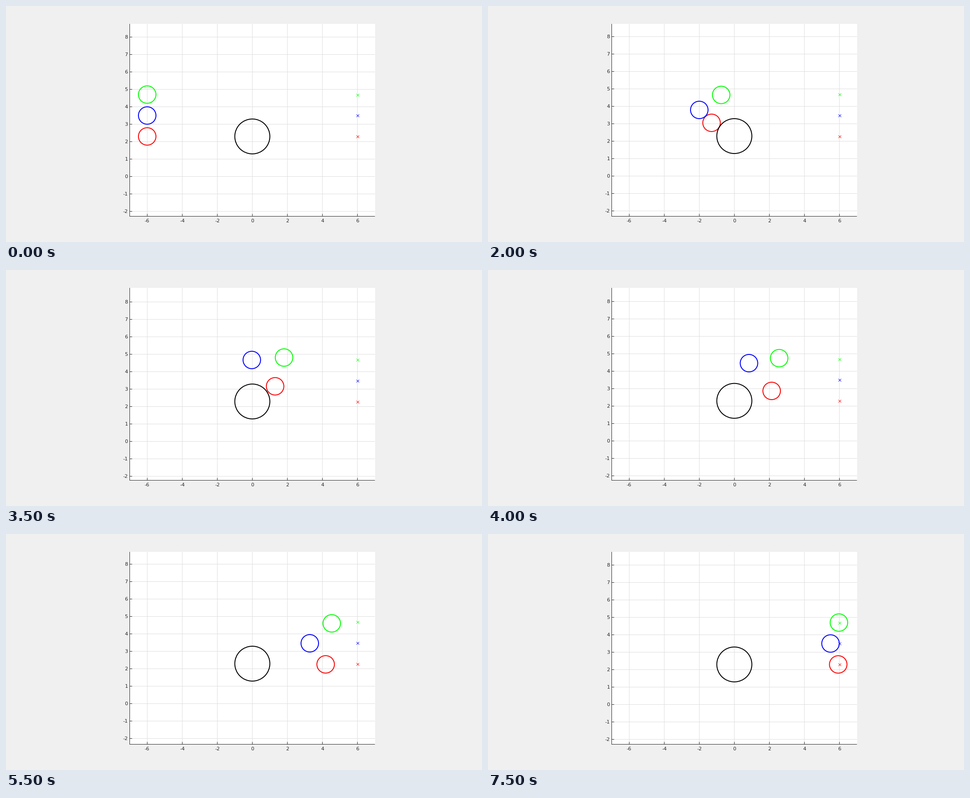
Animation of 1060x528 px, one loop 8000 ms. Source, as a matplotlib script:

```python
import math

import numpy as np
import matplotlib.pyplot as plt
from matplotlib.animation import FuncAnimation
from matplotlib.patches import Circle, Rectangle

W, H, DPI = 1060, 528, 100
PX = 72 / DPI                      # one pixel in points
FRAMES, STEP = 16, 500

# Plot area in pixels, y pointing down
LEFT, RIGHT, TOP, BOTTOM = 275, 821.6, 39.6, 470
MID_X, MID_Y, UNIT = 548.55, 254.75, 39.02
INK, GRID = "#262626", "#dedede"

BLOCK_Y, BLOCK_R = 2.3, 1.0
RADIUS, GOAL_X = 0.5, 6

# Key poses: steps, then x and y of each disc at those steps
KEYS = (0, 2, 4, 5, 7, 10, 13, 15)
PATHS = {
    "#ff0000": ((-6, -3.1, -1.3, -0.62, 1.3, 3.56, 5.22, 5.93),
                (2.3, 2.35, 3.06, 3.66, 3.17, 2.33, 2.3, 2.3)),
    "#0000ff": ((-6, -3.1, -2, -1.57, -0.03, 2.57, 4.49, 5.49),
                (3.5, 3.53, 3.8, 4.01, 4.68, 3.57, 3.5, 3.5)),
    "#00ff00": ((-6, -3.1, -0.75, 0.24, 1.81, 3.93, 5.5, 5.97),
                (4.7, 4.66, 4.66, 4.88, 4.82, 4.6, 4.69, 4.7)),
}


def spline(values, t):
    """Smooth curve through the values at the key steps."""
    slope = np.gradient(values, KEYS)
    i = min(np.searchsorted(KEYS, t, side="right") - 1, len(KEYS) - 2)
    h = KEYS[i + 1] - KEYS[i]
    s = (t - KEYS[i]) / h
    return ((2 * s**3 - 3 * s**2 + 1) * values[i]
            + (s**3 - 2 * s**2 + s) * h * slope[i]
            + (3 * s**2 - 2 * s**3) * values[i + 1]
            + (s**3 - s**2) * h * slope[i + 1])


def position(path, t):
    """Place on the path, kept outside the black circle."""
    x, y = (spline(values, t) for values in path)
    dist = math.hypot(x, y - BLOCK_Y)
    push = max(1, (BLOCK_R + RADIUS) / dist)
    return x * push, BLOCK_Y + (y - BLOCK_Y) * push


def to_x(x):
    return MID_X + x * UNIT


def to_y(y, middle):
    return MID_Y - (y - middle) * UNIT


def pixel(v):
    """Centre of the pixel that holds v, for crisp lines."""
    return math.floor(v) + 0.5


def line(xs, ys, color, z):
    return ax.plot(xs, ys, color=color, lw=PX, snap=False, zorder=z,
                   solid_capstyle="butt")[0]


def label(x, y, value, align):
    return ax.text(x, y, str(value), ha=align, va="baseline", color=INK,
                   fontsize=11 * PX, family="DejaVu Sans")


def ring(radius, color, z):
    return ax.add_patch(Circle((MID_X, MID_Y), radius * UNIT, fill=False,
                               ec=color, lw=2 * PX, zorder=z))


fig = plt.figure(figsize=(W / DPI, H / DPI), dpi=DPI, facecolor="#f0f0f0")
ax = fig.add_axes([0, 0, 1, 1])
ax.set_xlim(0, W)
ax.set_ylim(H, 0)
ax.axis("off")

ax.add_patch(Rectangle((LEFT, TOP), RIGHT - LEFT, BOTTOM - TOP,
                       color="white", lw=0, zorder=0))

for v in range(-6, 7, 2):
    x = pixel(to_x(v))
    line([x, x], [40, BOTTOM], GRID, 1)
    line([x, x], [BOTTOM - 5, BOTTOM], INK, 3)
    label(to_x(v), 484, v, "center")

line([LEFT, RIGHT], [pixel(BOTTOM)] * 2, INK, 3)
line([pixel(LEFT)] * 2, [40, BOTTOM + 1], INK, 3)

rows = [(v, line([LEFT, RIGHT], [0, 0], GRID, 1),
         line([LEFT, LEFT + 6], [0, 0], INK, 3),
         label(271.5, 0, v, "right")) for v in range(-2, 9)]

marks, discs = {}, {}
for color in PATHS:
    marks[color], = ax.plot([pixel(to_x(GOAL_X))], [0], "x", color=color,
                            ms=5.5 * PX, mew=0.9 * PX, snap=False, zorder=4)
    discs[color] = ring(RADIUS, color, 5)
block = ring(BLOCK_R, "black", 6)


def draw(n):
    spots = {c: position(p, n) for c, p in PATHS.items()}

    # The view is centred on the vertical extent of all circles
    top = max(y for _, y in spots.values()) + RADIUS
    middle = (top + BLOCK_Y - BLOCK_R) / 2

    for v, grid, tick, text in rows:
        y = pixel(to_y(v, middle))
        grid.set_ydata([y, y])
        tick.set_ydata([y, y])
        text.set_y(y + 3.5)
    for color, (x, y) in spots.items():
        goal_y = PATHS[color][1][0]
        marks[color].set_ydata([pixel(to_y(goal_y, middle))])
        discs[color].center = to_x(x), to_y(y, middle)
    block.center = MID_X, to_y(BLOCK_Y, middle)
    return []


anim = FuncAnimation(fig, draw, frames=FRAMES, interval=STEP,
                     init_func=lambda: draw(0), repeat=True, repeat_delay=0)
plt.show()
```
